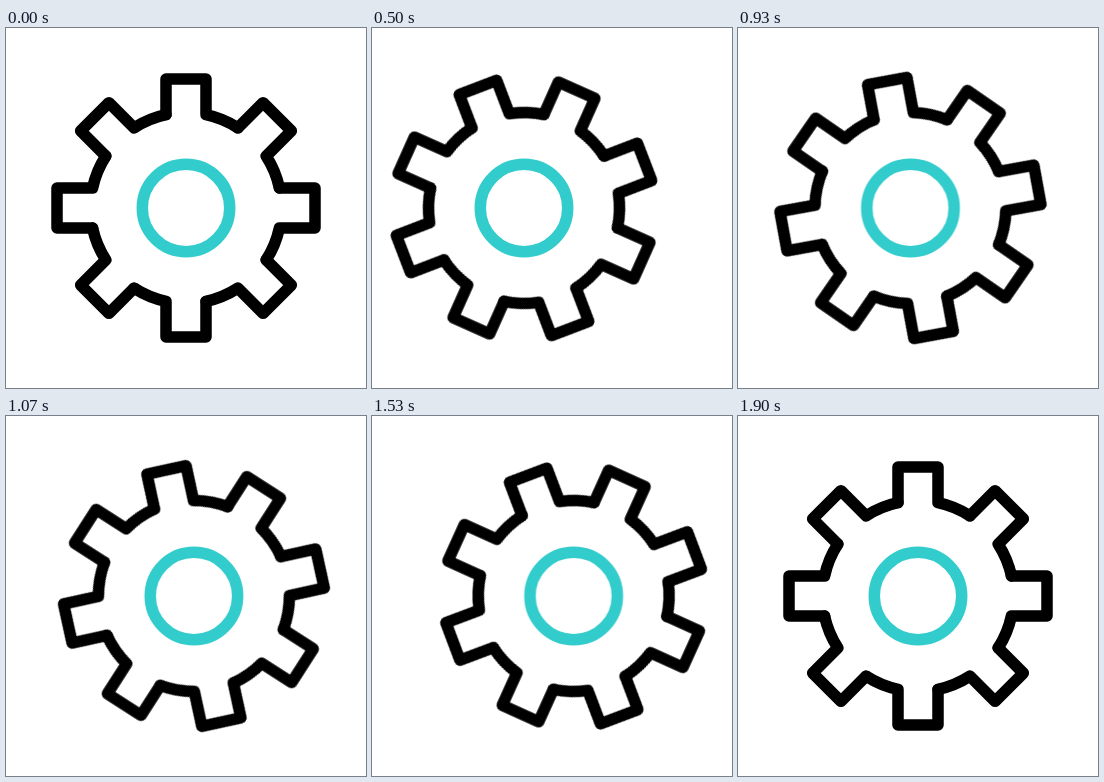
These frames come from a looping animation (360x360 px, 2000 ms). An HTML page:

```html
<!DOCTYPE html>
<html lang="en">
<head>
<meta charset="utf-8">
<title>Rolling gear</title>
<style>
  html, body { margin: 0; width: 100%; height: 100%; overflow: hidden; background: #fff; }
  svg { display: block; width: 100vw; height: 100vh; }

  .gear, .ring { fill: none; stroke-width: 11.5; stroke-linecap: round; stroke-linejoin: round; }
  .gear { stroke: #000; }
  .ring { stroke: #33cccc; }

  /* Paused: the script steps --t at 30 frames per second. */
  .slide, .gear {
    transform-origin: 0 0;
    animation: 2000ms linear calc(-1ms * var(--t, 0)) infinite paused;
  }
  .slide { animation-name: slide; }
  .gear { animation-name: spin; }

  @keyframes slide {
    0%   { transform: translateX(0); animation-timing-function: cubic-bezier(.33, 0, .64, 1); }
    30%  { transform: translateX(-30px); animation-timing-function: cubic-bezier(.36, 0, .63, 1); }
    70%  { transform: translateX(29.7px); animation-timing-function: cubic-bezier(.2, 0, .6, 1); }
    95%, 100% { transform: translateX(0); }
  }
  @keyframes spin {
    0%   { transform: rotate(0deg); animation-timing-function: cubic-bezier(.33, 0, .59, 1); }
    30%  { transform: rotate(-165deg); animation-timing-function: cubic-bezier(.42, 0, .63, 1); }
    70%  { transform: rotate(161deg); animation-timing-function: cubic-bezier(.18, 0, .58, 1); }
    95%, 100% { transform: rotate(0deg); }
  }
</style>
</head>
<body>
<svg viewBox="0 0 360 360">
  <defs>
    <!-- one tooth and the rim up to the next -->
    <path id="tooth" d="M-20-93.4V-129H20V-93.4A95.5 95.5 0 0 1 51.9-80.2"/>
  </defs>
  <g transform="translate(180 180)">
    <g class="slide">
      <g class="gear">
        <use href="#tooth"/>
        <use href="#tooth" transform="rotate(45)"/>
        <use href="#tooth" transform="rotate(90)"/>
        <use href="#tooth" transform="rotate(135)"/>
        <use href="#tooth" transform="rotate(180)"/>
        <use href="#tooth" transform="rotate(225)"/>
        <use href="#tooth" transform="rotate(270)"/>
        <use href="#tooth" transform="rotate(315)"/>
      </g>
      <circle class="ring" r="43.7"/>
    </g>
  </g>
</svg>
<script>
  const LOOP = 2000, STEP = 1000 / 30;
  const root = document.documentElement;

  function draw() {
    // Steps begin on the nearest 10 ms tick.
    const tick = Math.floor(performance.now() % LOOP / 10) * 10;
    const t = Math.floor((tick + 3.4) / STEP) * STEP;
    root.style.setProperty('--t', t.toFixed(2));
    requestAnimationFrame(draw);
  }
  draw();
</script>
</body>
</html>
```
